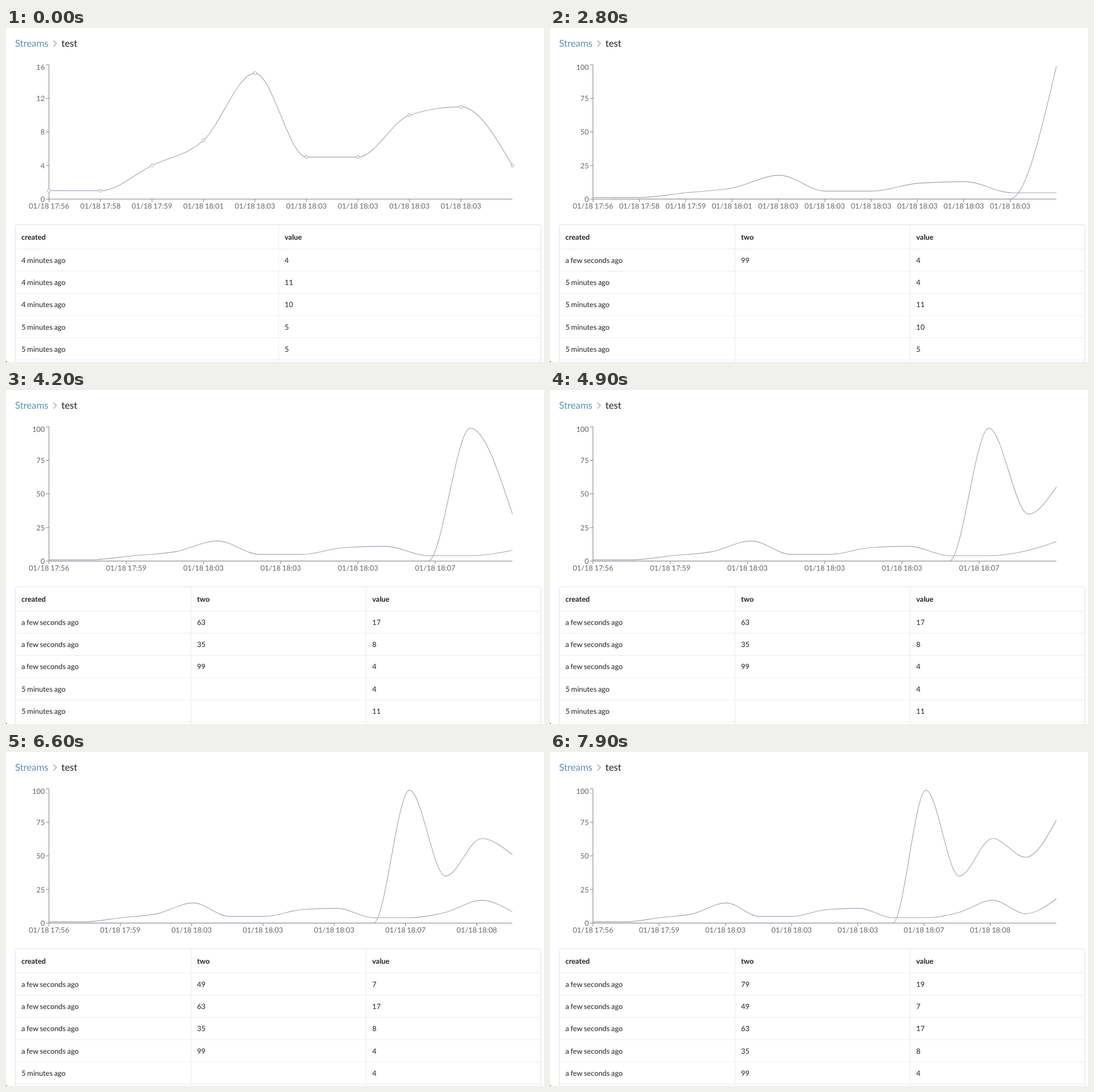
An HTML page that plays this animation: 949x590 px, repeating every 8 s.

```html
<!DOCTYPE html>
<html lang="en">
<head>
<meta charset="utf-8">
<title>Stream chart</title>
<style>
  html, body { margin: 0; width: 100%; height: 100%; overflow: hidden; background: #fff; }
  svg { display: block; font: 12.85px Lato, sans-serif; word-spacing: -.6px; text-rendering: geometricPrecision; }
  text { fill: #212121; }
  .crumb { font-size: 16.8px; }
  .link { fill: #5a8fb0; }
  .label { fill: #666; }
  .head { font-weight: 700; }
  .axis { stroke: #777; fill: none; stroke-width: .95; }
  .line { stroke: #a3a1b6; fill: none; stroke-width: 1.12; }
  .dot { stroke: #a3a1b6; fill: #fff; stroke-width: .95; }
  .frame { stroke: #e2e2e3; fill: none; }
  .rule { stroke: #ececec; fill: none; }
</style>
</head>
<body>
<svg width="949" height="590" viewBox="0 0 949 590">
  <text class="crumb link" x="16" y="33">Streams</text>
  <path d="M83.7 22.2l5.2 5.3-5.2 5.3" fill="none" stroke="#b3b3b3" stroke-width="1.7"/>
  <text class="crumb" x="97.7" y="33">test</text>
  <rect x="0" y="588.5" width="1.5" height="1.5" fill="#555"/>
  <path class="axis" d="M75.8 65V302.2H893.3"/>
  <rect class="frame" x="16.5" y="347.5" width="927" height="300" rx="3.7"/>
  <g id="table"></g>
  <g id="axes"></g>
  <g id="lines"></g>
</svg>
<script>
const LOOP = 8000, DURATION = 1500, LAG = 55;
const LEFT = 75.8, RIGHT = 893.3, TOP = 65, BASE = 302.2;
const value = [1, 1, 4, 7, 15, 5, 5, 10, 11, 4, 4, 8, 17, 7, 19];
const two = [...Array(10).fill(0), 99, 35, 63, 49, 79];
const clock = ["17:56", "17:58", "17:59", "18:01", ...Array(6).fill("18:03"), "18:07", "18:07", "18:08"];
const arrivals = [1600, 2900, 4200, 5690, 6845];   // one new reading each
const FIRST = 10;

const $ = id => document.getElementById(id);
const text = (x, y, s, cls = "", anchor = "start") =>
  `<text x="${x}" y="${y}" class="${cls}" text-anchor="${anchor}">${s}</text>`;
const path = (d, cls, extra = "") => `<path d="${d}" class="${cls}" ${extra}/>`;

const xAt = (i, n) => LEFT + (RIGHT - LEFT) * i / (n - 1);
const yAt = (v, max) => BASE - (BASE - TOP) * v / max;
const maxOf = step => step ? 100 : 16;

function points(series, step) {
  const n = FIRST + step;
  return series.slice(0, n).map((v, i) => [xAt(i, n), yAt(v, maxOf(step))]);
}

// CSS "ease": cubic-bezier(.25, .1, .25, 1)
function ease(t) {
  if (t <= 0) return 0;
  if (t >= 1) return 1;
  const bezier = (a, b, s) => 3 * a * (1 - s) ** 2 * s + 3 * b * (1 - s) * s * s + s ** 3;
  let lo = 0, hi = 1;
  for (let i = 0; i < 30; i++) {
    const mid = (lo + hi) / 2;
    if (bezier(.25, .25, mid) < t) lo = mid; else hi = mid;
  }
  return bezier(.1, 1, lo);
}

// Monotone cubic through the points
function curve(raw) {
  const p = raw.filter((q, i) => !i || q[0] - raw[i - 1][0] > 1e-6);
  const last = p.length - 1;
  const h = [], s = [], m = [];
  for (let i = 0; i < last; i++) {
    h[i] = p[i + 1][0] - p[i][0];
    s[i] = (p[i + 1][1] - p[i][1]) / h[i];
  }
  for (let i = 1; i < last; i++) {
    const mean = (s[i - 1] * h[i] + s[i] * h[i - 1]) / (h[i - 1] + h[i]);
    m[i] = (Math.sign(s[i - 1]) + Math.sign(s[i])) *
      Math.min(Math.abs(s[i - 1]), Math.abs(s[i]), Math.abs(mean) / 2);
  }
  m[0] = (3 * s[0] - m[1]) / 2;
  m[last] = (3 * s[last - 1] - m[last - 1]) / 2;
  let d = "M" + p[0];
  for (let i = 0; i < last; i++) {
    const [x0, y0] = p[i], [x1, y1] = p[i + 1], k = h[i] / 3;
    d += `C${[x0 + k, y0 + k * m[i], x1 - k, y1 - k * m[i + 1], x1, y1]}`;
  }
  return d;
}

// Each point slides from its old place; the newest splits off the previous last one
function morph(series, step, p) {
  const to = points(series, step);
  if (!step) return to;
  const from = points(series, step - 1);
  from.push(from[from.length - 1]);
  return to.map((q, i) => q.map((c, j) => from[i][j] + (c - from[i][j]) * p));
}

function drawTable(step) {
  const cols = step ? [16.5, 326.3, 635.3] : [16.5, 480.8];
  const heads = step ? ["created", "two", "value"] : ["created", "value"];
  let out = cols.slice(1).map(x => path(`M${x} 348V590`, "rule")).join("");
  heads.forEach((s, c) => out += text(cols[c] + 10.7, 374, s, "head"));
  for (let r = 0; r < 6; r++) {
    const top = 390.4 + r * 39.2, i = FIRST + step - 1 - r;
    out += path(`M17 ${top}H943`, "rule");
    if (r > 4) break;
    const age = i >= FIRST ? "a few seconds ago" : !step && i > 6 ? "4 minutes ago" : "5 minutes ago";
    const cells = step ? [age, two[i] || "", value[i]] : [age, value[i]];
    cells.forEach((s, c) => out += text(cols[c] + 10.7, top + 24.6, s));
  }
  $("table").innerHTML = out;
}

function drawAxes(step) {
  const n = FIRST + step, max = maxOf(step);
  const stride = (RIGHT - LEFT) / (n - 1) < 75 ? 2 : 1;
  let out = "";
  for (let i = 0; i < n - 1; i += stride) {
    const x = xAt(i, n);
    out += path(`M${x} ${BASE}v5.5`, "axis") + text(x, 318.8, "01/18 " + clock[i], "label", "middle");
  }
  for (let q = 0; q <= 4; q++) {
    const y = yAt(q, 4);
    out += path(`M${LEFT} ${y}h-5.5`, "axis") +
      text(68.5, y + (q == 4 ? 8.8 : 4.7), max * q / 4, "label", "end");
  }
  $("axes").innerHTML = out;
}

function drawLines(step, p) {
  const pts = morph(value, step, p);
  let out = path(curve(pts), "line");
  if (step == 1) {
    // first appearance: drawn on from the right end
    out += path(curve(points(two, 1)), "line", `pathLength="1" stroke-dasharray="${p} 2" stroke-dashoffset="${p - 1}"`);
  } else if (step) {
    out += path(curve(morph(two, step, p)), "line");
  } else {
    out += pts.map(([x, y]) => `<circle class="dot" cx="${x}" cy="${y}" r="2.75"/>`).join("");
  }
  $("lines").innerHTML = out;
}

let shown = -1;
function render(now) {
  const t = now % LOOP;
  const step = arrivals.filter(a => a <= t).length;
  if (step != shown) {
    drawTable(step);
    drawAxes(step);
    shown = step;
  }
  drawLines(step, step ? ease((t - arrivals[step - 1] - LAG) / DURATION) : 1);
}

const start = performance.now();
function loop() {
  render(performance.now() - start);
  requestAnimationFrame(loop);
}
loop();
</script>
</body>
</html>
```
